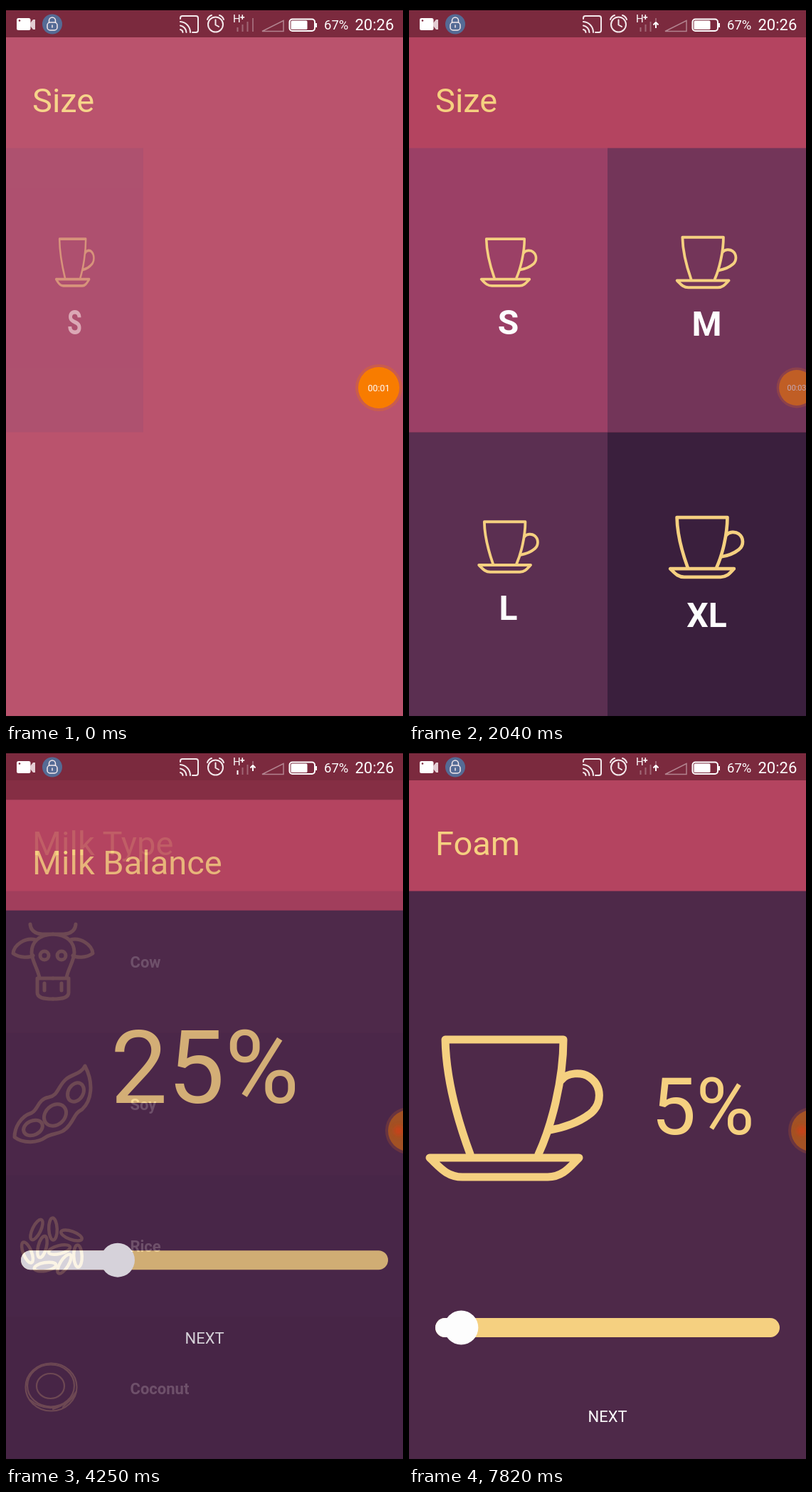
An HTML page for the animation above (7990 ms loop, 558 px wide and 1004 px high).

```html
<!DOCTYPE html>
<html lang="en">
<head>
<meta charset="utf-8">
<title>Coffee order</title>
<style>
  html, body { margin: 0; width: 100%; height: 100%; overflow: hidden; background: #000; }
  svg { display: block; width: 558px; height: 1004px; font-family: Roboto, sans-serif; }
  .line { fill: none; stroke: #f5d080; stroke-linecap: round; stroke-linejoin: round; }
  .title, .value { fill: #f5d080; }
  .title { font-size: 47px; }
  .white { fill: #fdfdfd; }
  .mid { text-anchor: middle; }
  .bold { font-weight: 700; fill: #fdfdfd; }
  .thin { fill: none; stroke: #f4e9ec; stroke-width: 2; stroke-linecap: round; stroke-linejoin: round; }
</style>
</head>
<body>
<svg id="stage" viewBox="0 0 558 1004"></svg>
<script>
const LOOP = 7990, STEP = 170;
const stage = document.getElementById('stage');
const $ = id => document.getElementById(id);
const clamp = v => Math.max(0, Math.min(1, v));
const smooth = v => v * v * (3 - 2 * v);

const rect = (x, y, w, h, fill, r = 0) =>
  `<rect x="${x}" y="${y}" width="${w}" height="${h}" rx="${r}" fill="${fill}"/>`;
const text = (x, y, size, str, cls, id = '') =>
  `<text id="${id}" x="${x}" y="${y}" font-size="${size}" class="${cls}">${str}</text>`;
const ellipse = (x, y, rx, ry, turn = 0) =>
  `<ellipse cx="${x}" cy="${y}" rx="${rx}" ry="${ry}" transform="rotate(${turn} ${x} ${y})"/>`;
const path = (d, extra = '') => `<path d="${d}" ${extra}/>`;
const lines = (width, body) => `<g class="line" stroke-width="${width}">${body}</g>`;

const cup = (x, y, sx, sy) => `<g transform="translate(${x} ${y}) scale(${sx} ${sy}) translate(-148 -504.5)">` +
  lines(11, path('M86 569C66 515 52 458 51 408H217C217 465 200 530 182 569') +
    path('M214 465C222 454 243 453 254 461C272 474 271 498 256 511C240 524 217 532 198 535') +
    path('M29 574H239C226 587 216 601 195 601H75C53 601 43 587 29 574Z')) + '</g>';

const screen = (id, title, bg, body) => `<g id="${id}">` +
  rect(0, 44, 558, 960, bg) + rect(0, 44, 558, 155.5, '#b44460') + rect(0, 6, 558, 38, '#7b2a3e') +
  text(37, 149, 47, title, 'title') + body + '</g>';

const slider = (id, x, y, w) => rect(x, y - 13.5, w, 27, '#f5d080', 13.5) +
  `<rect id="${id}Fill" x="${x}" y="${y - 13.5}" height="27" rx="13.5" class="white"/>` +
  `<circle id="${id}Thumb" cy="${y}" r="24" class="white"/>`;

// label, box corner, colour, cup centre and scale, label baseline, fold axis
const tiles = [
  ['S', 0, 199.5, '#9b4066', 140, 360, .323, .341, 461, 'x', 0],
  ['M', 279, 199.5, '#733559', 418, 360, .347, .366, 463, 'x', 279],
  ['XL', 279, 598.5, '#3a1f3d', 418, 760, .427, .434, 872, 'y', 598.5],
  ['L', 0, 598.5, '#5b2f51', 139.5, 759.5, .347, .366, 862, 'x', 279]
];
const sizeBody = tiles.map(([name, x, y, fill, cx, cy, sx, sy, base], i) =>
  `<g id="tile${i}">` + rect(x, y, 279, 399, fill) + cup(cx, cy, sx, sy) +
  text(x + 139.5, base, 48, name, 'bold mid') + '</g>').join('');

const halfCow = path('M66 260H51Q35 259 34 246M66 260C46 261 36 271 36 286C37 299 44 307 47 321' +
  'M42 268C27 264 11 275 10 287C20 294 33 293 38 290M66 322H44V342C44 349 52 351 66 351M54 329V339') +
  ellipse(54, 290, 6, 6);
const cow = lines(5, halfCow + `<g transform="translate(132 0) scale(-1 1)">${halfCow}</g>`);
const soy = lines(5, path('M111 445C105 457 93 456 84 464C72 475 74 486 60 489C44 492 46 506 36 511' +
  'C20 516 12 532 12 545C25 555 45 553 56 545C66 538 78 543 89 528C97 518 96 512 107 506C120 494 124 470 111 445Z') +
  ellipse(98, 482, 10.5, 14, 30) + ellipse(69, 514, 17, 13.5, -42) + ellipse(38, 532, 14, 10, -25));
const grains = [[43, 675, -64], [66, 674, 88], [92, 683, 20], [30, 707, 68], [51, 699, -76],
  [75, 703, -14], [101, 712, 88], [55, 727, -10], [82, 723, -58]];
const rice = lines(4.5, grains.map(([x, y, a]) => ellipse(x, y, 15.5, 5.8, a)).join(''));
const coconut = lines(2.2, ellipse(63.5, 896, 36, 33.5) + ellipse(63, 894, 33, 29.5) +
  ellipse(62.5, 894.5, 19.5, 17.5) + path('M34 914Q52 930 76 923M66 927Q88 920 98 903M80 924L97 908'));

const rows = [['Cow', '#50294f', cow], ['Soy', '#421f4b', soy], ['Rice', '#321a44', rice], ['Coconut', '#2b173b', coconut]];
const rowTop = i => 199.5 + i * 199.3;
const milkBody = rows.map(([name, fill, icon], i) =>
  `<g id="row${i}">` + rect(0, rowTop(i), 558, 200, fill) + icon +
  text(174.5, 307 + i * 199.6, 22, name, 'bold') + '</g>').join('');

const balanceBody = text(279.5, 470, 143, '25%', 'value mid', 'percent') +
  slider('milk', 21, 690.5, 516) + text(279, 808, 22, 'NEXT', 'white mid');
const foamBody = cup(148, 504.5, 1, 1) + text(413, 541, 112, '5%', 'value mid') +
  slider('foam', 37, 812.5, 484) + text(279, 945, 22, 'NEXT', 'white mid');

const statusBar = `
  <rect x="15" y="17" width="19.5" height="17" rx="2.5" fill="#fff"/>
  <path d="M34 24L38 19H41V33H38L34 28Z" fill="#e3cdd3"/><circle cx="19" cy="20.5" r="1.3" fill="#7b2a3e"/>
  <circle cx="65" cy="25.5" r="14" fill="#556b95"/>
  <g class="thin" stroke-width="1.5" style="stroke-width:1.5"><rect x="58" y="23" width="14" height="11" rx="4"/>
    <path d="M60.5 23V20.5A4.5 4.5 0 0 1 69.5 20.5V23M65 27V30"/></g>
  <g class="thin"><path d="M245 18V17Q245 14 248 14H267Q270 14 270 17V34Q270 37 267 37H262"/>
    <path d="M245 22A15 15 0 0 1 259 37M245 27.5A10 10 0 0 1 253.5 37M245 33A4.5 4.5 0 0 1 248.5 37"/>
    <circle cx="294.5" cy="26" r="10.5"/><path d="M294.5 19.5V26.5L299 29M283 19Q284.5 14.5 289 13M306 19Q304.500 14.5 300 13"/></g>
  ${text(319, 23, 15, 'H', 'white')}${text(329, 20, 12, '+', 'bold')}
  <g stroke="#fff" stroke-width="2"><path d="M325.500 36V30" id="bar" opacity=".3"/>
    <path d="M332.500 36V26M339.500 36V22M347 36V17" opacity=".28"/></g>
  <g id="net" fill="none" stroke="#fff" stroke-width="2"><rect x="343" y="21" width="8" height="15" fill="#7b2a3e" stroke="none"/>
    <path d="M347 31V23M343.500 26.500L347 23L350.500 26.500"/><path id="down" d="M347 28V35M343.500 31.500L347 35L350.500 31.500"/></g>
  <path d="M360 35.500H390V20.500Z" fill="none" stroke="#fff" stroke-width="1.500" opacity=".42"/>
  <rect x="398.500" y="18.500" width="35.500" height="16.500" rx="4" class="thin" style="stroke:#fff"/>
  <rect x="400.500" y="20.500" width="23" height="12.500" rx="1.500" fill="#fff"/>
  <path d="M435 24H437V30H435Z" fill="#fff"/>
  ${text(447, 32.5, 18.5, '67%', 'white')}${text(490.5, 34, 22, '20:26', 'white')}`;

stage.innerHTML = `<defs><filter id="soft" x="-1" y="-1" width="3" height="3"><feGaussianBlur stdDeviation="3"/></filter></defs>` +
  screen('size', 'Size', '#b44460', sizeBody) + `<rect id="veil" y="44" width="558" height="953" fill="#fff"/>` +
  screen('type', 'Milk Type', '#b44460', milkBody) +
  screen('balance', 'Milk Balance', '#4e2949', balanceBody) +
  screen('foamScreen', 'Foam', '#4e2949', foamBody) + statusBar +
  `<g id="rec"><circle r="33" fill="#e06a20" opacity=".4"/><circle id="disc" r="29" fill="#f87c00"/>
   ${text(0, 4.500, 12.5, '', 'white mid', 'clock')}</g>
   <circle id="glow" cx="552" cy="536" r="7" fill="#cf3f14" filter="url(#soft)" opacity=".85"/>` +
  rect(0, 0, 558, 6, '#000') + rect(0, 997, 558, 7, '#000');

const show = (id, on) => $(id).style.display = on ? '' : 'none';

function fold(id, axis, origin, k) {
  show(id, k > 0);
  $(id).setAttribute('transform', axis === 'x'
    ? `translate(${origin * (1 - k)} 0) scale(${k} 1)`
    : `translate(0 ${origin * (1 - k)}) scale(1 ${k})`);
}

// New screen rises a little while it fades in.
function enter(id, t, start) {
  show(id, t > start);
  $(id).setAttribute('transform', `translate(0 ${80 * (1 - clamp((t - start) / 350)) ** 5})`);
  $(id).setAttribute('opacity', 1 - (1 - clamp((t - start) / 200)) ** 4);
}

function setSlider(id, left, zero, unit, value) {
  const x = zero + unit * value;
  $(id + 'Thumb').setAttribute('cx', x);
  $(id + 'Fill').setAttribute('width', x - left);
}

// time, centre x, scale, opacity
const recKeys = [[0, 524, 1, 1], [850, 529, .96, .93], [1190, 545, .86, .58], [4100, 545, .86, .58], [4240, 566, 1, .5], [LOOP, 566, 1, .5]];
function recorder(t) {
  const i = recKeys.findIndex(k => k[0] > t);
  const a = recKeys[i - 1], b = recKeys[i], k = (t - a[0]) / (b[0] - a[0]);
  const [x, s, o] = [1, 2, 3].map(n => a[n] + (b[n] - a[n]) * k);
  $('rec').setAttribute('transform', `translate(${x} 536) scale(${s})`);
  $('rec').setAttribute('opacity', o);
  $('clock').textContent = '00:0' + Math.floor(1.1 + t / 1000);
  const docked = t >= 4240;
  show('clock', !docked);
  show('glow', docked);
}

function draw(t) {
  tiles.forEach((tile, i) => fold('tile' + i, tile[9], tile[10], clamp((t + 215 - i * 311) / 311)));
  $('tile0').setAttribute('opacity', .5 + .5 * clamp(t / 340));
  $('veil').setAttribute('opacity', .08 * (1 - clamp(t / 340)));
  enter('type', t, 2280);
  rows.forEach((row, i) => fold('row' + i, 'y', rowTop(i), clamp((t - 2580 - i * 225) / 225)));
  enter('balance', t, 4182);
  const milk = Math.round(25 + 27 * smooth(clamp((t - 4800) / 1600)));
  $('percent').textContent = milk + '%';
  setSlider('milk', 21, 34.7, 4.89, milk);
  enter('foamScreen', t, 7190);
  setSlider('foam', 37, 50.5, 4.57, 5);
  recorder(t);

  const beat = Math.floor(t / STEP);
  show('net', t >= 1700);
  show('down', beat === 21 || beat === 38 || (beat > 25 && beat < 42 && beat % 4 !== 0));
  $('bar').setAttribute('opacity', beat === 25 ? 1 : .3);
}

function tick(now) {
  draw(Math.floor((now % LOOP) / STEP) * STEP);
  requestAnimationFrame(tick);
}
draw(0);
requestAnimationFrame(tick);
</script>
</body>
</html>
```
